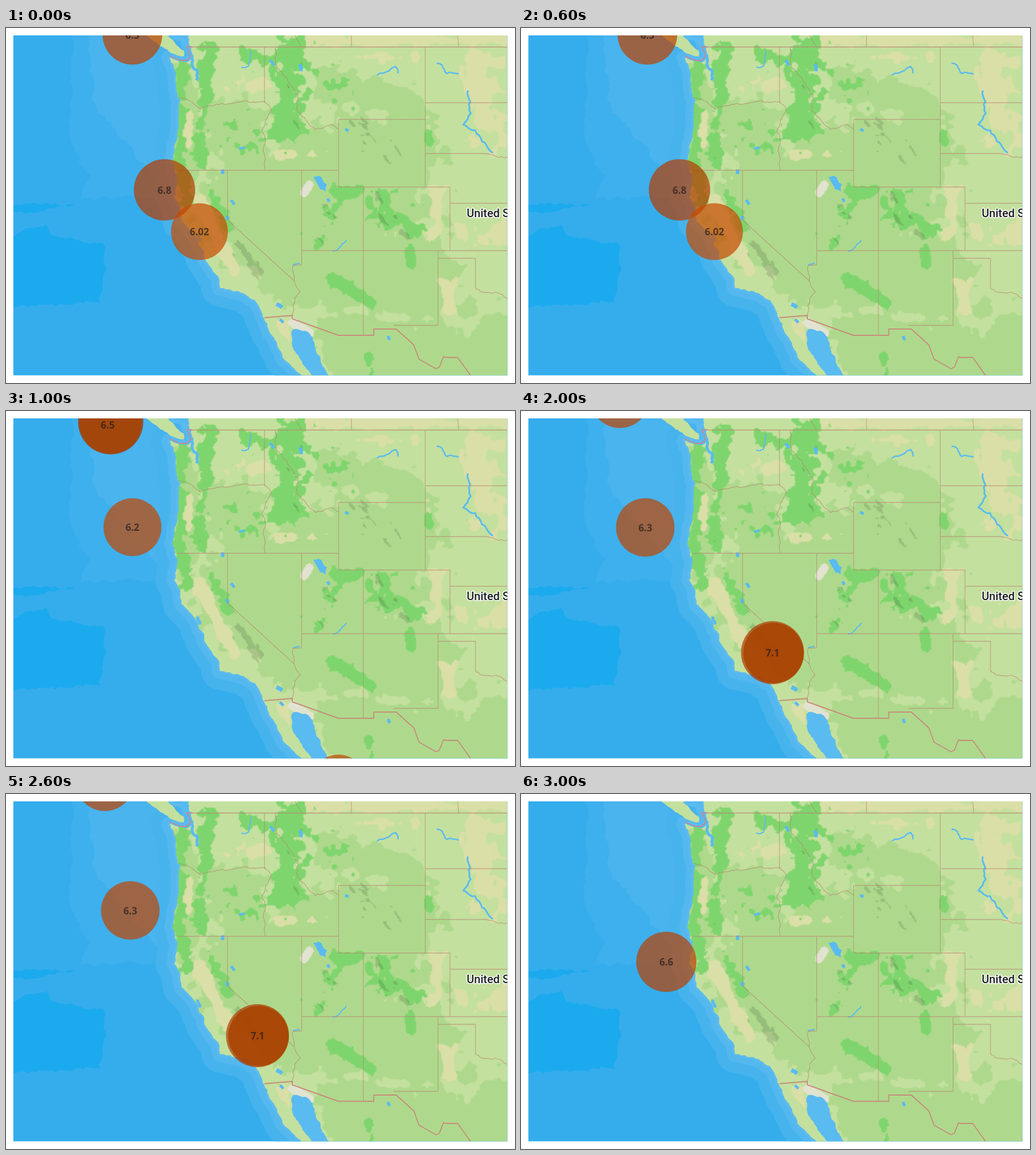
An HTML page with a canvas for the animation above (4000 ms loop, 896 px wide and 625 px high).

```html
<!DOCTYPE html>
<html lang="en">
<head>
<meta charset="utf-8">
<title>Earthquake map</title>
<style>
html, body { margin: 0; width: 100%; height: 100%; overflow: hidden; background: #fff; }
canvas, svg { position: absolute; left: 0; top: 0; }
.mag { font: 700 17px "Open Sans", sans-serif; fill: rgba(35,28,28,.7); text-anchor: middle; }
.place { font: 500 20px Roboto, sans-serif; fill: #1c1f22; stroke: #fff; stroke-width: 3px; stroke-linejoin: round; paint-order: stroke; }
</style>
</head>
<body>
<canvas id="map" width="896" height="625"></canvas>
<svg width="896" height="625">
  <svg x="13" y="13" width="869.5" height="598.5" viewBox="13 13 869.5 598.5">
    <g id="quakes"></g>
    <text class="place" x="811" y="333">United States</text>
  </svg>
</svg>
<script>
const ctx = document.getElementById('map').getContext('2d');
ctx.lineJoin = 'round';
ctx.beginPath();
ctx.rect(13, 13, 869.5, 598.5);
ctx.clip();

let seed = 7;
const rand = () => (seed = (seed * 16807) % 2147483647) / 2147483647;

// Displaces the midpoint of every long edge, so a few points give a natural outline.
function rough(str, cap, closed = true) {
  const pts = str.trim().split(/\s+/).map(p => p.split(',').map(Number)), out = [pts[0]];
  const split = (a, b) => {
    const dx = b[0] - a[0], dy = b[1] - a[1], len = Math.hypot(dx, dy);
    if (len < 7) return out.push(b);
    const j = (rand() * 2 - 1) * Math.min(.25, cap / len);
    const m = [(a[0] + b[0]) / 2 - dy * j, (a[1] + b[1]) / 2 + dx * j];
    split(a, m);
    split(m, b);
  };
  for (let i = 1; i < pts.length; i++) split(pts[i - 1], pts[i]);
  if (closed) split(pts[pts.length - 1], pts[0]);
  return new Path2D('M' + out.join('L') + (closed ? 'Z' : ''));
}
function fill(color, path) { ctx.fillStyle = color; ctx.fill(path); }
function line(color, width, path) { ctx.strokeStyle = color; ctx.lineWidth = width; ctx.stroke(path); }

// Two octaves of value noise, about -.5 to .5
function hash(x, y, s) {
  const h = Math.imul(x * 374761393 + y * 668265263 + s * 69069 | 0, 1274126177);
  return (Math.imul(h ^ h >>> 15, 2246822519) >>> 0) / 4294967296;
}
function layer(x, y, s) {
  const i = Math.floor(x), j = Math.floor(y), u = x - i, v = y - j;
  const a = hash(i, j, s), b = hash(i + 1, j, s), c = hash(i, j + 1, s), d = hash(i + 1, j + 1, s);
  return a + (b - a) * u + (c - a) * v + (a - b - c + d) * u * v;
}
const noise = (x, y, size, s) =>
  .65 * layer(x / size, y / size, s) + .35 * layer(x * 2.3 / size, y * 2.3 / size, s + 1) - .5;

// Strongest pull at a point of belts [x1, y1, x2, y2, width, strength]
function pull(belts, x, y) {
  let best = 0;
  for (const [x1, y1, x2, y2, w, s] of belts) {
    const dx = x2 - x1, dy = y2 - y1;
    const t = Math.max(0, Math.min(1, ((x - x1) * dx + (y - y1) * dy) / (dx * dx + dy * dy)));
    const d = ((x - x1 - t * dx) ** 2 + (y - y1 - t * dy) ** 2) / (w * w);
    if (d < 4) best = Math.max(best, s * Math.exp(-d));
  }
  return best;
}

const forests = [
  [356, 40, 342, 235, 17, .85], [310, 65, 306, 240, 14, .85], [315, 262, 316, 305, 20, .9], [350, 272, 392, 345, 13, .8],
  [425, 45, 450, 55, 22, .65], [503, 40, 495, 175, 38, .95], [550, 70, 595, 110, 35, .45], [390, 185, 425, 200, 45, .45],
  [575, 290, 620, 286, 14, .8], [580, 300, 545, 375, 20, .65], [655, 310, 705, 345, 42, .62], [710, 360, 712, 415, 12, .75],
  [575, 442, 640, 482, 15, .9], [744, 186, 746, 197, 10, 1], [638, 580, 640, 611, 10, .8]
];
const shrubs = [
  [400, 175, 440, 260, 60, .95], [440, 310, 640, 310, 110, 1], [530, 240, 690, 215, 75, 1], [520, 420, 710, 430, 85, 1],
  [600, 560, 850, 590, 65, .95], [570, 95, 715, 140, 35, .8], [310, 75, 320, 250, 30, .8], [820, 500, 860, 520, 40, .6]
];
const steppes = [
  [342, 305, 403, 430, 14, 1], [325, 150, 318, 205, 9, .9], [395, 105, 445, 100, 25, .7], [480, 225, 560, 220, 13, .6],
  [530, 20, 880, 20, 13, .9], [835, 50, 860, 200, 42, .65], [755, 300, 750, 370, 24, .6], [800, 350, 880, 360, 42, .65],
  [780, 450, 780, 500, 20, .65], [487, 520, 500, 550, 10, .9], [620, 52, 720, 52, 13, .5]
];
const relief = [
  [620, 175, 675, 225, 32, .7], [400, 365, 440, 425, 22, .8], [655, 300, 710, 400, 35, .65],
  [575, 300, 560, 370, 30, .5], [500, 60, 500, 160, 35, .5], [350, 60, 345, 220, 20, .5]
];
const salt = [[525, 290, 534, 276, 9, 1], [505, 519, 534, 537, 10, 1]];

// One rule chooses the ground cover; it is sampled at half size.
function terrain() {
  const c = document.createElement('canvas'), w = c.width = 448, h = c.height = 313;
  const g = c.getContext('2d'), img = g.createImageData(w, h);
  for (let j = 0, k = 0; j < h; j++) for (let i = 0; i < w; i++, k += 4) {
    const x = i * 2 + 1, y = j * 2 + 1;
    let rgb = [195, 224, 158];
    if (pull(salt, x, y) > .5) rgb = [225, 227, 208];
    else if (pull(forests, x, y) + 1.2 * noise(x, y, 13, 1) > .55) rgb = [127, 213, 109];
    else if (pull(steppes, x, y) + 1.1 * noise(x, y, 20, 4) > .5) rgb = [217, 223, 166];
    else if (pull(shrubs, x, y) + .9 * noise(x, y, 19, 7) > .4) rgb = [174, 217, 140];
    const shade = pull(relief, x, y) + 1.3 * noise(x - y * .6, y * .6, 10, 11) > .78 ? .87 : 1;
    img.data.set([...rgb.map(v => v * shade), 255], k);
  }
  g.putImageData(img, 0, 0);
  return c;
}

// Ocean, growing lighter towards the shore
const land = rough(`288,53 299,80 302,121 306,125 302,190 293,232 302,265 296,298 307,316 309,340 322,353 338,372 340,384
  349,393 351,408 375,440 377,458 405,463 438,479 451,502 467,540 487,580 520,611 520,640 910,640 910,0 318,0 326,55 318,60`, 1.5);
const island = rough('246,10 262,24 290,44 313,50 313,40 296,24 284,6', 1.5);
const water = '#5abbf0';
ctx.fillStyle = '#35adec';
ctx.fillRect(0, 0, 896, 625);
fill('#1caaee', rough('0,375 40,352 70,346 82,366 172,380 165,485 40,492 0,496', 4));
fill('#1caaee', rough('0,308 120,312 40,326 0,325', 2));
fill('#3db0ed', rough('120,0 300,0 300,295 130,302 150,260 115,200', 4));
fill('#49b4ed', rough('140,0 300,0 300,290 268,270 215,205 160,150', 4));
line('#46b3ed', 66, land);
line('#54b8ee', 28, land);
line(water, 8, land);

ctx.save();
const ground = new Path2D(land);
ground.addPath(island);
ctx.clip(ground);
ctx.drawImage(terrain(), 0, 0, 896, 626);
ctx.restore();

// Inland water
fill(water, rough('540,616 518,583 503,555 502,540 506,530 527,533 540,545 543,560 556,592 571,616', 1.5));
fill(water, rough('541,262 550,260 565,275 563,288 553,284', 2));
line(water, 8, rough('288,12 312,22 322,35 326,50 318,56 292,49', 2, false));
for (const [width, course] of [
  [5, '327,52 331,72 337,76 335,92'], [2.5, '653,83 675,75 686,68 690,80'], [2.5, '758,62 768,66 776,80 797,81'],
  [3, '813,110 818,150 805,170 826,180 838,200 857,220'], [2, '575,393 586,388 599,373'], [2, '505,417 517,414'],
  [2, '414,69 427,67 431,40'], [7, '476,486 486,492'], [5, '482,513 488,519'], [6, '517,64 519,76'], [4, '410,213 420,210'],
  [6, '381,249 381,257'], [5, '396,303 402,311'], [6, '390,331 390,338'], [5, '338,362 341,376'], [5, '597,178 603,181'],
  [5, '465,57 471,66'], [5, '673,542 676,549'], [5, '566,300 569,306']
]) line(water, width, rough(course, 2, false));

// State and country borders
const border = 'rgba(186,128,112,.6)';
line(border, 1.3, new Path2D(`M508 13L520 33M608 13V33M795 13L797 33M302 250.5H585.5M585.5 161H738V280H585.5Z
  M738 33V161M738 131.5H883M738 221H845M738 280H781.5V392M781.5 308.5H883M629 280V540M520 392H883
  M520.500 250V417L505 418M390 250V338L507 445M455 33V131M760.500 392V523.500H682M760 405.500H826.500V457`));
for (const course of [
  '304,122 327,130 342,143 358,137 412,130 457,130', '455,131 467,143 450,183 456,190 456,250',
  '476,33 476,65 514,118 512,146 545,179 575,170 585,178', '505,418 507,445 518,465 508,480 503,507',
  '845,221 868,228 883,226', '826,457 838,465 862,465 883,476'
]) line(border, 1.3, rough(course, 2, false));
line('rgba(190,130,110,.75)', 1.6, new Path2D('M326 33.5H883'));
line('#c48793', 1.8, new Path2D('M288 49L307 57H318L325 50L322 40L318 33H328'));
line('#c68d7c', 1.9, new Path2D(`M455 510L504 506V512L585 541H647.5V530H687L718 558L727 583L757 600L763 597L770 579
  L776 580H795L808 598L818 612`));

// Each scene: circles [x, y, magnitude, label, colour]; size and colour follow the magnitude.
const cluster = 'rgba(169,67,2,.85)';
const scenes = [
  [[222.5, 12, 6.5, '6.5'], [279, 285, 6.8, '6.8'], [340.5, 358.5, 6.02, '6.02']],
  [[184.3, 19, 7.5], [184, 20.5, 7, '', cluster], [179, 24, 6.5, '6.5', 'none'], [222.6, 204.5, 6.2, '6.2'], [585, 656, 6.2]],
  [[174, -22, 6.4], [218.8, 205, 6.3, '6.3'], [442.8, 425.5, 7.1, '7.1'], [444.5, 426, 6.6, '', cluster]],
  [[255.8, 295.5, 6.6, '6.6']]
];
const quakes = document.getElementById('quakes');
function add(parent, tag, attrs, text = '') {
  const el = document.createElementNS('http://www.w3.org/2000/svg', tag);
  for (const k in attrs) el.setAttribute(k, attrs[k]);
  el.textContent = text;
  return parent.appendChild(el);
}
function tint(mag) {
  const t = mag - 6.2;
  return `rgba(${195 - 22 * t},${71 - 17 * t},0,.7)`;
}
const groups = scenes.map(list => {
  const g = add(quakes, 'g', {});
  for (const [cx, cy, mag, , color] of list) add(g, 'circle', { cx, cy, r: 20 + 5 * mag, fill: color || tint(mag) });
  for (const [x, y, , label] of list) if (label) add(g, 'text', { class: 'mag', x, y: y + 6.5 }, label);
  return g;
});

function draw() {
  const now = Math.floor(performance.now() % 4000 / 1000);
  groups.forEach((g, i) => g.setAttribute('visibility', i === now ? 'visible' : 'hidden'));
  requestAnimationFrame(draw);
}
draw();
</script>
</body>
</html>
```
